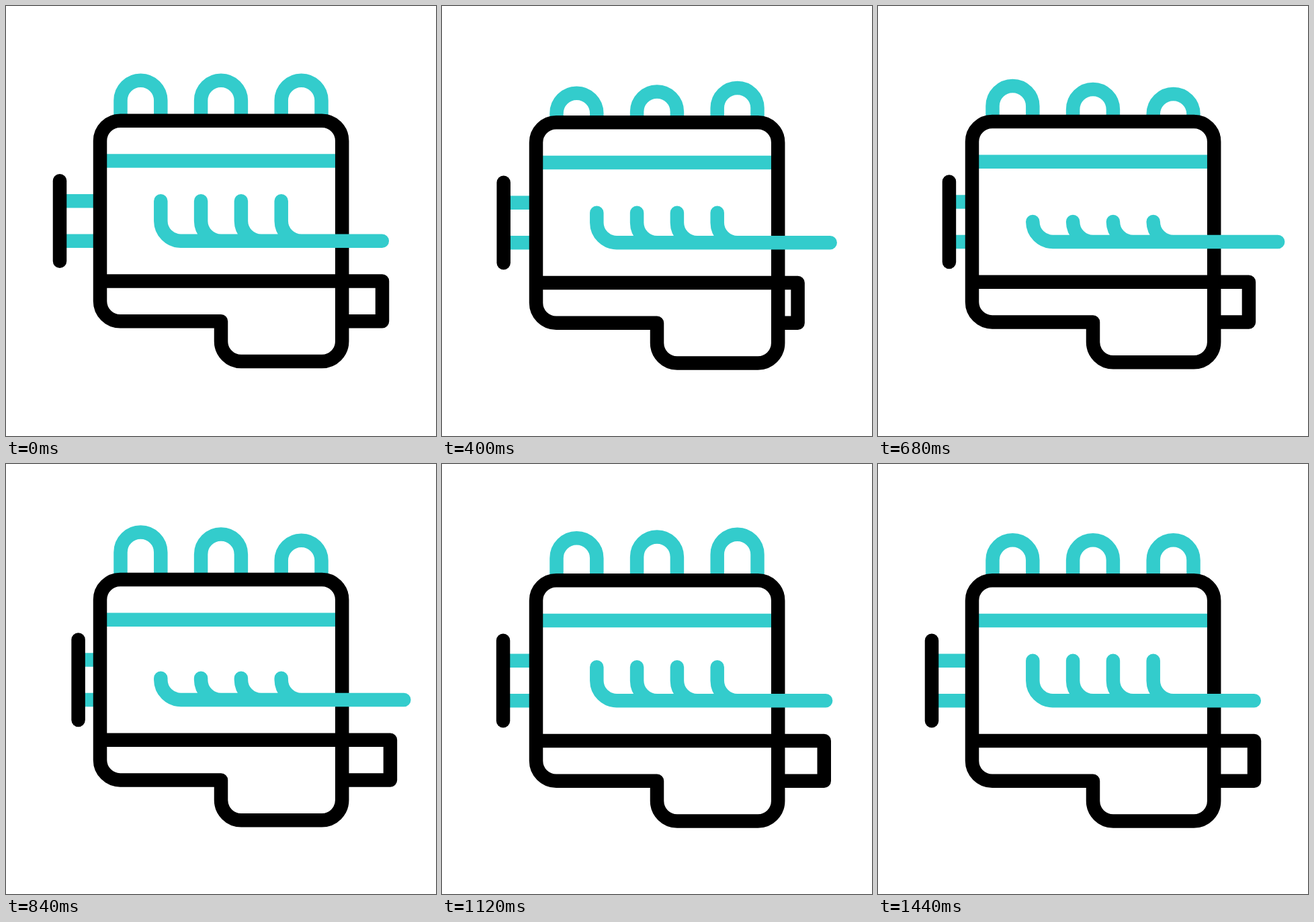
An HTML page for the animation above (1.48 s loop, 640x640 px).

```html
<!DOCTYPE html>
<html lang="en">
<head>
<meta charset="utf-8">
<title>Engine</title>
<style>
  html, body { margin: 0; height: 100%; overflow: hidden; background: #fff; }
  svg { display: block; width: 100%; height: 100%; }
  path { fill: none; stroke: #000; stroke-width: 20.5; stroke-linejoin: round; }
  .teal { stroke: #33cccc; }
  .round { stroke-linecap: round; }
</style>
</head>
<body>
<svg viewBox="0 0 640 640">
  <g id="engine">
    <path id="hoops" class="teal"/>
    <path id="shaft" class="teal"/>
    <path class="teal" d="M140 230.5H500"/>
    <path id="pulley" class="round"/>
    <path d="M320 469.2H170a30 30 0 0 1-30-30V200.7a30 30 0 0 1 30-30H470.2a30 30 0 0 1 30 30V499a30 30 0 0 1-30 30H350a30 30 0 0 1-30-30Z"/>
    <path id="gearbox"/>
    <path id="exhaust" class="teal round"/>
  </g>
</svg>
<script>
const LOOP = 1480, STEP = 40;
const $ = id => document.getElementById(id);
const draw = (id, d) => $(id).setAttribute('d', d);

// Eased interpolation through [time, value] keys, held at both ends.
function track(t, ...keys) {
  if (t <= keys[0][0]) return keys[0][1];
  for (let i = 1; i < keys.length; i++) {
    const [t0, v0] = keys[i - 1], [t1, v1] = keys[i];
    if (t < t1) {
      const s = (t - t0) / (t1 - t0);
      return v0 + (v1 - v0) * s * s * (3 - 2 * s);
    }
  }
  return keys[keys.length - 1][1];
}

// Vertical vibration, with a short rest near the end of the loop.
function shake(t) {
  if (t <= 80) return 0;
  const resting = t >= 1360 && t <= 1400;
  return resting || t / STEP % 2 ? 1.2 : 2.5;
}

function render(now) {
  const t = Math.floor(now % LOOP / STEP) * STEP;
  $('engine').setAttribute('transform', `translate(0 ${shake(t)})`);

  draw('hoops', [80, 120, 200].map((start, i) => {
    const drop = track(t - start, [0, 0], [440, 20.3], [800, -11.4], [1160, 0]);
    const x = 170.5 + 119.6 * i;
    return `M${x} 170.7V${140.6 + drop}a29.9 29.9 0 0 1 59.8 0V170.7`;
  }).join(''));

  const px = 80 + track(t, [80, 0], [800, 28], [1360, 0]);
  draw('shaft', `M${px} 290.3H140M${px} 349.8H140`);
  draw('pulley', `M${px} 260.3V379.7`);

  const gx = 560 + track(t, [80, 0], [440, -31.5], [920, 15.4], [1360, 0]);
  draw('gearbox', `M140 409.5H${gx}V469.2H500`);

  const push = track(t, [80, 0], [720, 1], [1360, 0]);
  const runners = [0, 1, 2, 3].map(i =>
    `M${230.3 + 59.8 * i} ${290.2 + 30 * push}V320a30 30 0 0 0 30 29.8`);
  draw('exhaust', runners.join('') + `M260 349.8H${559.8 + 35.8 * push}`);
}

const begin = performance.now();
function tick() {
  render(performance.now() - begin);
  requestAnimationFrame(tick);
}
tick();
</script>
</body>
</html>
```
